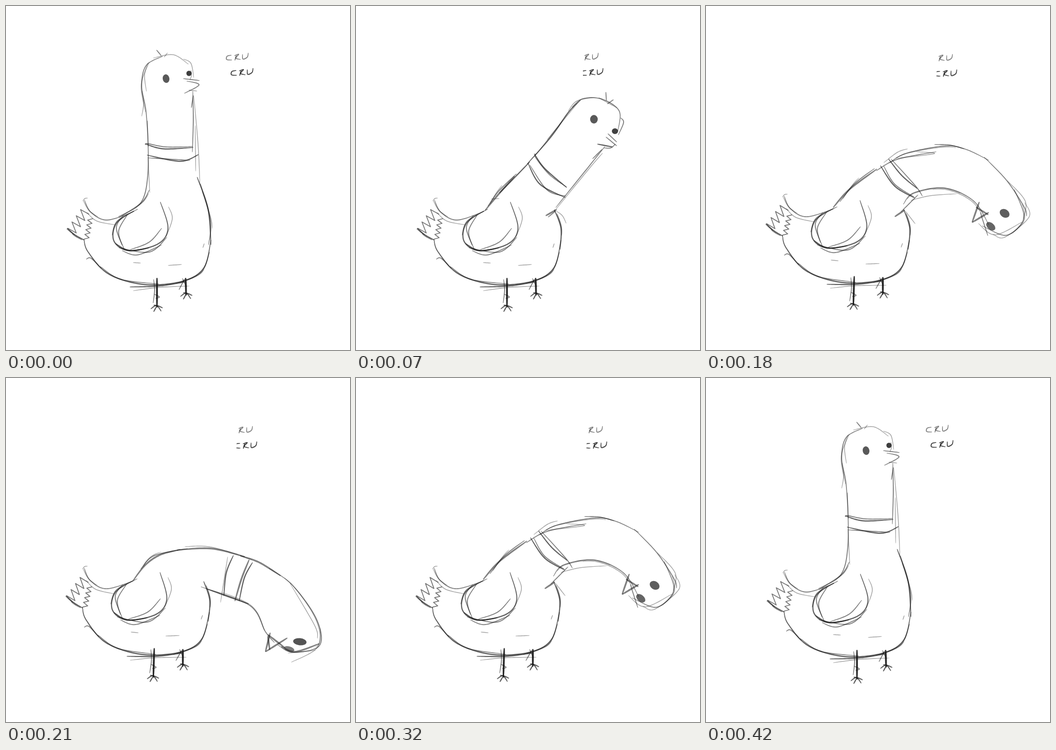
An HTML page with a canvas that plays this animation: 720 by 720 pixels, repeating every 490 ms.

```html
<!DOCTYPE html>
<html lang="en">
<head>
<meta charset="utf-8">
<title>Pecking bird</title>
<style>
html, body { margin: 0; width: 100%; height: 100%; overflow: hidden; background: #fff; }
canvas { display: block; width: 720px; height: 720px; }
</style>
</head>
<body>
<canvas id="stage" width="720" height="720" role="img" aria-label="A sketched bird bobs its head: cru cru"></canvas>
<script>
const ctx = document.getElementById('stage').getContext('2d');
const STEP = 70;
const INK = a => `rgba(18,18,18,${a})`;

let seed = 1;
const random = () => (seed = seed * 16807 % 2147483647) / 2147483647;

// Smooth curve through the points
function spline(p) {
  const out = [], last = p.length - 1;
  const at = i => p[Math.max(0, Math.min(last, i))];
  for (let i = 0; i < last; i++) {
    const [a, b, c, d] = [at(i - 1), at(i), at(i + 1), at(i + 2)];
    for (let t = 0; t < 1; t += 1 / 16) {
      out.push([0, 1].map(n => b[n] + t / 2 * (c[n] - a[n] +
        t * (2 * a[n] - 5 * b[n] + 4 * c[n] - d[n] + t * (3 * (b[n] - c[n]) + d[n] - a[n])))));
    }
  }
  return [...out, p[last]];
}

// Pencil line with thin ends, pushed sideways from one offset to another
function pencil(curve, width, alpha, from = 0, to = 0) {
  const end = curve.length - 1, left = [], right = [];
  curve.forEach(([x, y], i) => {
    const a = curve[Math.max(0, i - 1)], b = curve[Math.min(end, i + 1)];
    const dx = b[0] - a[0], dy = b[1] - a[1], len = Math.hypot(dx, dy) || 1;
    const t = i / end, shift = from + (to - from) * t;
    const half = width / 2 * (.4 + .6 * Math.sqrt(Math.abs(Math.sin(Math.PI * t))));
    left.push([x - dy / len * (shift + half), y + dx / len * (shift + half)]);
    right.unshift([x - dy / len * (shift - half), y + dx / len * (shift - half)]);
  });
  ctx.fillStyle = INK(alpha);
  ctx.beginPath();
  left.concat(right).forEach(p => ctx.lineTo(...p));
  ctx.fill();
}

// A pen draws one line, then loose lighter strands along parts of it
const pen = (width, alpha) => (text, strands = 0) => {
  const curve = spline(text.split(' ').map(p => p.split(',').map(Number)));
  pencil(curve, width, alpha);
  for (let i = 0; i < strands; i++) {
    const first = Math.floor((i + random() * .4) / (strands + 1) * curve.length);
    const part = curve.slice(first, first + Math.ceil(curve.length * .5));
    pencil(part, width * .85, alpha * .7, random() * 7 - 3.5, random() * 7 - 3.5);
  }
};
const soft = pen(1.6, .38), mid = pen(2, .53), dark = pen(2.5, .66);
const thick = pen(3.6, .53), bold = pen(3.8, .9);

function blob(x, y, rx, ry, tilt, alpha) {
  ctx.fillStyle = INK(alpha);
  ctx.beginPath();
  ctx.ellipse(x, y, rx, ry, tilt, 0, Math.PI * 2);
  ctx.fill();
}

function zigzag(x, y, stepX, stepY, inX, inY, teeth) {
  ctx.strokeStyle = INK(.58);
  ctx.lineWidth = 1.8;
  ctx.lineJoin = 'round';
  ctx.beginPath();
  for (let i = 0; i < teeth; i++) {
    ctx.lineTo(x + stepX * i, y + stepY * i);
    ctx.lineTo(x + stepX * i + inX, y + stepY * i + inY);
  }
  ctx.stroke();
}

function tail() {
  soft('161,408 165,403 171,402');
  mid('164,406 178,432 212,448 268,430', 1);
  soft('169,432 190,450 228,458');
  zigzag(129, 465, 9, -13, 18, 10, 4);
  zigzag(163, 488, 2, -10, 11, -3, 5);
  dark('128,465 144,479 164,490', 2);
}

function torso() {
  dark('163,488 172,515 215,561 290,583 370,576 414,548 429,490');
  mid('168,530 178,528 200,550');
  mid('197,545 240,572 320,582');
  dark('259,588 320,586 378,577');
  soft('266,596 320,589 384,586');
  mid('356,581 408,558 426,515', 1);
  soft('412,506 415,497');
  soft('266,537 282,538');
  soft('339,543 368,541');
}

function wing() {
  dark('323,410 339,465 318,498 258,512 226,492 231,455 268,429');
  dark('229,497 258,512 300,506');
  soft('340,420 348,445 335,483');
  mid('326,465 300,494 260,510');
  mid('337,484 300,515 236,506');
  mid('246,438 231,465 248,510');
  mid('254,437 236,470 243,501');
  mid('243,512 275,521 326,500');
  mid('222,480 233,450 276,425');
}

function foot(x, y) {
  ctx.save();
  ctx.translate(x, y);
  dark('-12,3 0,-4 10,8');
  dark('-6,-5 4,-3 13,1');
  dark('-6,9 0,-2');
  ctx.restore();
}

function legs() {
  bold('316,569 316,631');
  mid('309,572 311,595 308,622');
  mid('310,603 321,609 313,612');
  foot(315, 631);
  bold('376,569 377,606');
  mid('374,571 362,594');
  mid('369,570 378,588');
  foot(377, 605);
}

function cru() {
  mid('472,103 463,105 462,112 473,113');
  mid('482,103 479,114');
  mid('478,104 487,101 481,109 491,112');
  mid('495,101 496,111 505,107 507,98');
}

function words(clip) {
  ctx.save();
  if (clip) {
    ctx.beginPath();
    ctx.rect(475, 80, 80, 80);
    ctx.clip();
  }
  cru();
  ctx.translate(10, 32);
  cru();
  cru();
  ctx.restore();
}

function body(clip) {
  seed = 7;
  tail();
  torso();
  wing();
  legs();
  words(clip);
  if (clip) dark('415,426 429,465 427,510', 1);
}

function upright() {
  body(false);
  mid('315,92 325,104');
  soft('338,98 331,107');
  mid('328,105 293,125 284,168 293,220 298,295');
  soft('300,117 283,165 292,222');
  soft('297,119 290,145 294,179');
  soft('285,178 288,205 284,231');
  soft('308,109 350,102 382,122');
  soft('371,111 387,120 393,150');
  mid('371,152 405,156');
  mid('378,157 404,165 373,183');
  soft('382,176 400,178');
  soft('387,134 388,146 385,154');
  blob(335, 152, 7, 9, -.2, .7);
  blob(383, 141, 5.5, 5.5, 0, .82);

  mid('296,240 297,350 282,412 235,441');
  soft('297,315 301,391');
  mid('300,385 283,412 236,443', 1);
  mid('391,178 392,240 390,306');
  mid('388,213 392,187');
  soft('393,188 402,290 406,375');
  soft('396,250 397,346');
  dark('292,289 330,299 392,296');
  mid('292,291 296,288 335,295 391,294');
  dark('295,312 365,325 403,311');
  mid('298,318 385,323');
  dark('400,358 423,425 429,500');
  mid('407,372 428,450 424,500', 1);
}

function leaning() {
  body(true);
  thick('270,428 300,392 332,356');
  dark('300,392 364,326');
  mid('276,419 299,387 336,351', 1);
  soft('283,404 300,403');
  dark('358,331 408,274 445,222 470,197');
  soft('378,310 432,240');
  soft('400,280 464,203');
  mid('452,212 475,194 515,195 551,220 548,262');
  soft('444,220 462,199 499,191');
  soft('508,192 546,213');
  mid('554,234 560,244 549,270');
  mid('523,180 524,198');
  mid('539,196 526,205');
  blob(498, 237, 8, 9, 0, .7);
  blob(542, 262, 6.5, 6, 0, .8);
  mid('527,267 546,285');
  mid('523,274 546,293');
  dark('505,289 537,295');
  mid('519,297 533,297 543,289');

  mid('521,294 480,345 418,422');
  soft('516,308 490,338 414,431');
  mid('515,300 495,320');
  thick('397,439 420,426');
  mid('402,442 418,429');
  soft('419,429 432,439 440,455');
  dark('373,309 395,340 441,380');
  mid('378,309 376,317 405,353 441,379');
  dark('360,329 385,373 438,401');
  mid('364,333 400,385 439,398');
}

// The sheet is turned slightly while the bird bends down
function turned() {
  ctx.save();
  ctx.translate(430, 385);
  ctx.rotate(.0314);
  ctx.translate(-430, -385);
  body(true);
  ctx.restore();
}

function bending() {
  turned();
  thick('266,422 300,384 358,341');
  mid('280,410 312,371 353,340', 1);
  mid('356,345 400,321 482,305');
  mid('384,328 420,308 500,293 544,300 592,323', 1);
  soft('372,328 401,306 422,299');
  soft('397,319 478,309 440,305');
  mid('478,290 510,291 540,299');
  mid('582,316 630,366 666,421 671,440');
  mid('645,384 665,435 655,462 625,480 578,460', 1);
  soft('630,365 668,408 664,446');
  soft('667,411 676,442 625,484 600,477');
  soft('570,455 605,479 662,452');

  mid('413,415 435,391 500,381 560,408 592,458', 2);
  soft('428,407 470,397 525,393');
  thick('395,441 416,427');
  mid('407,432 444,395');
  soft('417,429 438,456');
  dark('382,320 410,355 442,382');
  mid('387,320 438,376 453,398');
  dark('365,334 395,377 437,402');
  mid('372,335 395,373 436,400');
  thick('572,410 557,453');
  thick('557,453 592,432');
  thick('565,421 591,437');
  mid('574,432 590,481');
  blob(625, 434, 11, 8.5, .6, .68);
  blob(596, 461, 11, 7, .7, .65);
}

function pecking() {
  turned();
  thick('266,424 292,391 323,370 365,359');
  mid('282,400 310,372 380,357', 1);
  thick('358,360 430,357 500,374');
  soft('374,353 430,354 515,380');
  thick('490,372 530,386 575,414');
  mid('550,398 600,434 650,505 656,560 600,574 568,558', 1);
  soft('594,429 646,518 652,545');
  soft('658,524 650,566 597,595');
  thick('576,562 605,573 656,556');
  soft('590,576 648,570');

  mid('408,437 510,476 543,531 562,554', 1);
  dark('419,441 508,473');
  dark('476,371 461,408 456,456');
  soft('464,374 449,470');
  thick('509,380 493,420 479,467');
  dark('516,386 499,418 488,467');
  thick('553,533 543,573');
  thick('543,573 589,544');
  thick('548,537 584,565');
  thick('548,540 552,569');
  blob(615, 552, 14, 7.5, .1, .72);
  blob(593, 567, 11, 5, .3, .55);
}

const poses = [upright, leaning, bending, pecking, bending, leaning, upright];
const start = performance.now();
let shown;

function tick() {
  const pose = poses[Math.floor((performance.now() - start) / STEP) % poses.length];
  if (pose !== shown) {
    shown = pose;
    ctx.clearRect(0, 0, 720, 720);
    pose();
  }
  requestAnimationFrame(tick);
}
tick();
</script>
</body>
</html>
```
